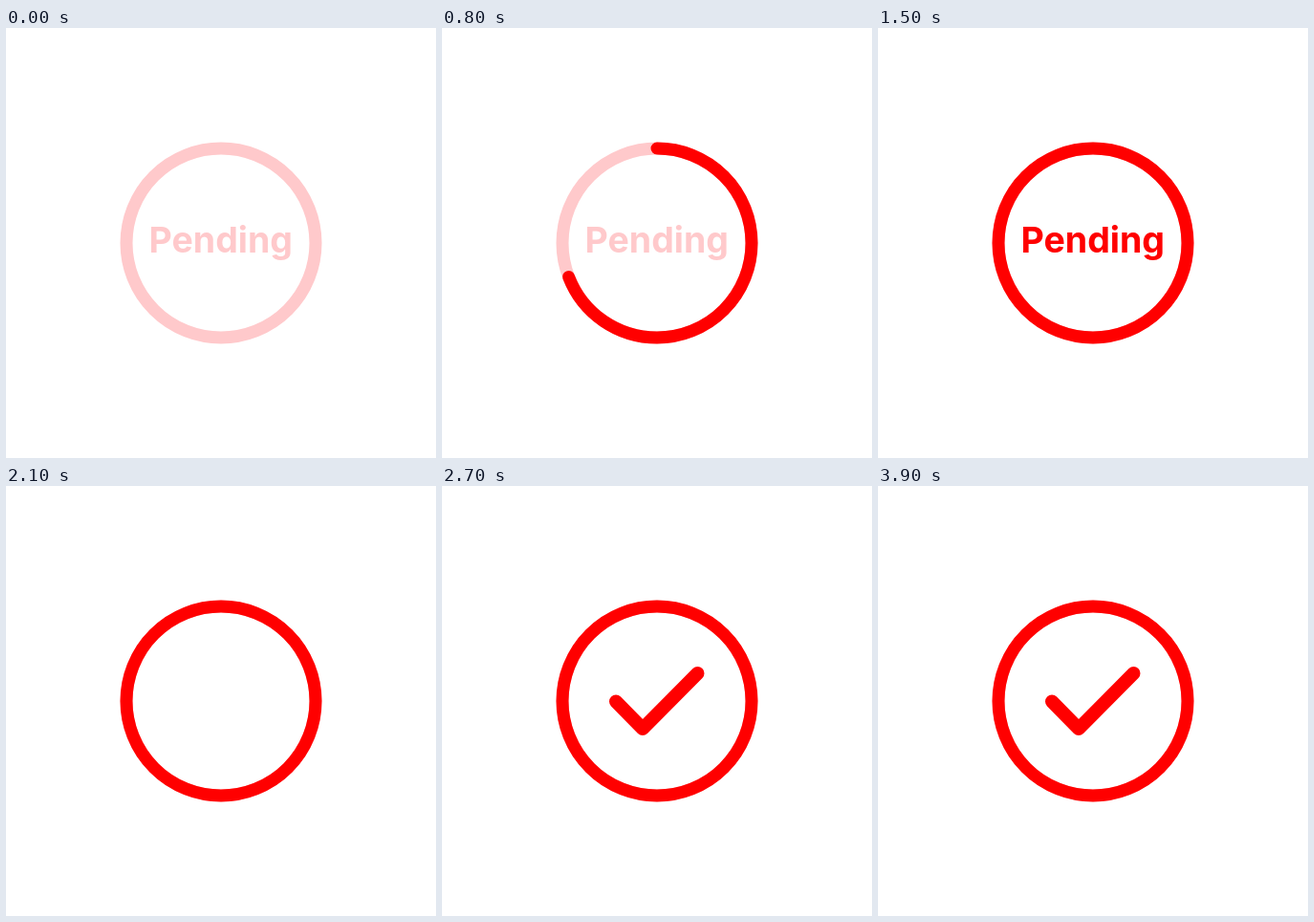
Animation, 450 px wide and 450 px high, one loop 4 s. Source, as an HTML page:

```html
<!DOCTYPE html>
<html lang="en">
<head>
<meta charset="utf-8">
<title>Pending</title>
<style>
  html, body { margin: 0; width: 100%; height: 100%; overflow: hidden; background: #fff; }
  svg { display: block; width: 100vw; height: 100vh; }
  .ring, .line { fill: none; stroke: #f00; stroke-linecap: round; stroke-linejoin: round; }
  .ring { stroke-width: 13px; }
  .line { stroke-width: 14px; }
  .base { stroke: #ffc9cb; }
  text { font: 700 37.5px Inter, sans-serif; fill: #ffc9cb; }
  .fill { fill: #f00; }
</style>
</head>
<body>
<svg viewBox="0 0 450 450">
  <clipPath id="wipe"><rect id="wipeBox" x="150" y="190" width="0" height="70"/></clipPath>
  <g transform="translate(225 225) rotate(-90)">
    <circle id="ripple" class="ring" r="99"/>
    <circle class="ring base" r="99"/>
    <circle id="arc" class="ring" r="99" pathLength="1"/>
  </g>
  <g id="label">
    <text x="149.5" y="235">Pending</text>
    <text class="fill" x="149.5" y="235" clip-path="url(#wipe)">Pending</text>
  </g>
  <path id="check" class="line" d="M182 225.5 L210 254 L267.5 196" pathLength="1"/>
</svg>
<script>
const LOOP = 4000, STEP = 100;
const [arc, ripple, label, wipeBox, check] =
  ['arc', 'ripple', 'label', 'wipeBox', 'check'].map(id => document.getElementById(id));

// Cubic Bezier easing with control points (x1, 0) and (x2, 1).
const bezier = (x1, x2) => x => {
  let lo = 0, hi = 1;
  for (let i = 0; i < 24; i++) {
    const u = (lo + hi) / 2;
    const at = 3 * x1 * u * (1 - u) ** 2 + 3 * x2 * u * u * (1 - u) + u ** 3;
    if (at < x) lo = u; else hi = u;
  }
  return 3 * lo * lo * (1 - lo) + lo ** 3;
};
const easeInOut = bezier(0.42, 0.58);
const easeOut = bezier(0, 0.58);
// Ease-in is ease-out turned around.
const easeIn = x => {
  let lo = 0, hi = 1;
  for (let i = 0; i < 24; i++) {
    const u = (lo + hi) / 2;
    const at = 1.26 * u * (1 - u) ** 2 + 3 * u * u * (1 - u) + u ** 3;
    if (at < x) lo = u; else hi = u;
  }
  return 3 * lo * lo * (1 - lo) + lo ** 3;
};

const progress = (t, from, to) => Math.min(1, Math.max(0, (t - from) / (to - from)));
const show = (el, on) => el.setAttribute('visibility', on ? 'visible' : 'hidden');

function trace(el, p) {
  show(el, p > 0);
  el.setAttribute('stroke-dasharray', p < 1 ? `${p} 2` : 'none');
}

function draw(t) {
  trace(arc, easeIn(progress(t, 0, 1000)));
  wipeBox.setAttribute('width', 149.5 * easeOut(progress(t, 1000, 1500)));
  show(label, t < 2100);
  trace(check, easeInOut(progress(t, 2200, 2700)));

  const p = progress(t, 2700, 2900);
  show(ripple, p > 0 && p < 1);
  ripple.setAttribute('transform', `scale(${1 + p})`);
  ripple.setAttribute('opacity', 0.5 * (1 - p));
}

const start = performance.now();
function tick() {
  const t = (performance.now() - start) % LOOP;
  draw(Math.floor(t / STEP) * STEP);
  requestAnimationFrame(tick);
}
tick();
</script>
</body>
</html>
```
